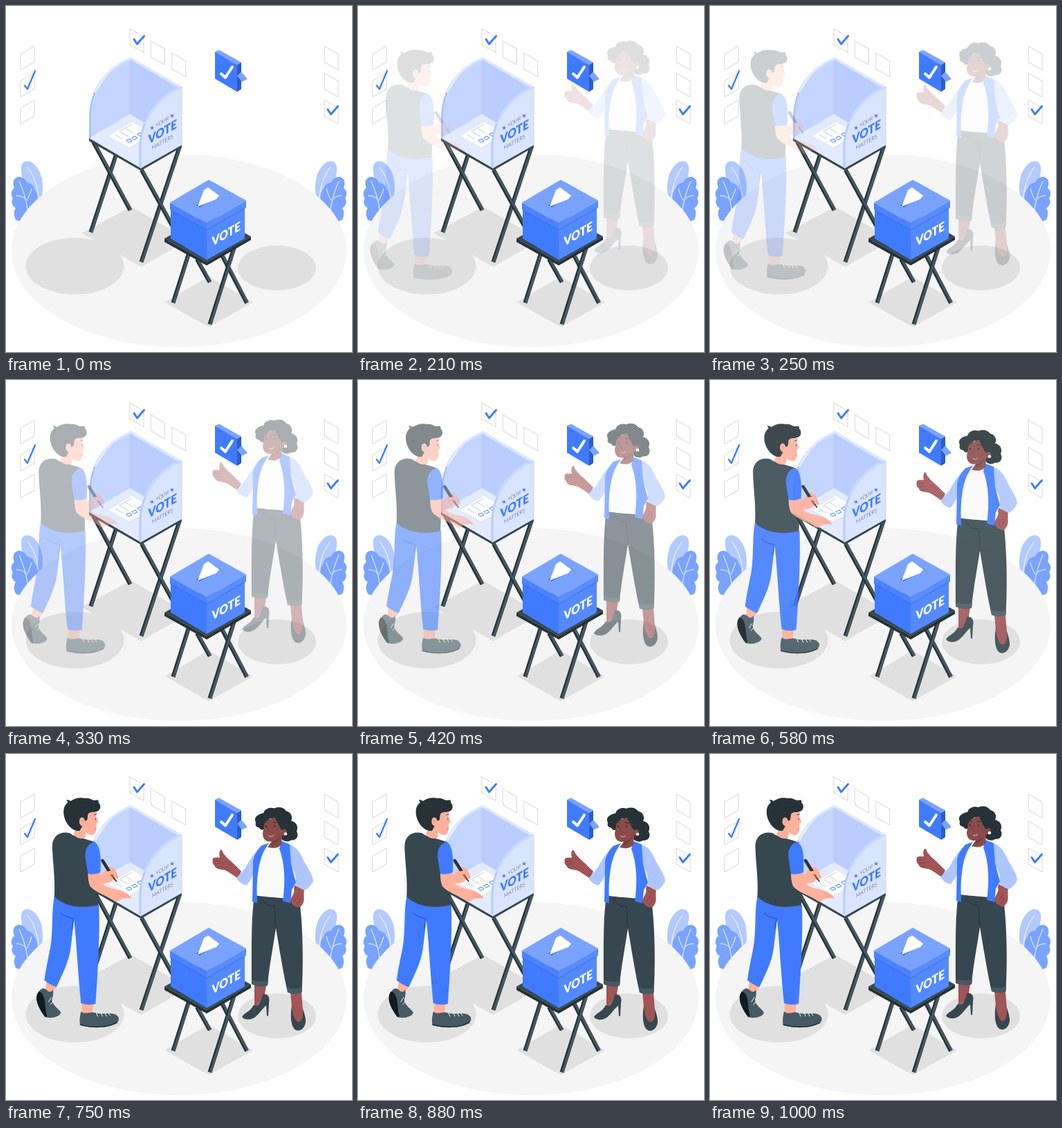
Animation, 500 px wide and 500 px high, one loop 1040 ms. Source, as an HTML page:

```html
<!DOCTYPE html>
<html lang="en">
<head>
<meta charset="utf-8">
<title>Voting day</title>
<style>
  html, body { margin: 0; width: 100%; height: 100%; overflow: hidden; background: #fff; }
  svg { display: block; width: 100%; height: 100%; }
  .bold { font: 900 18px Lato, sans-serif; }
  .thin { font: 300 8px Lato, sans-serif; fill: #37474f; }
  .blue { fill: #407bff; }
  .dark { fill: #263238; }
  .slate { fill: #37474f; }
  .shoe { fill: #455a64; }
  .white { fill: #fff; }
  .shade { fill: #e0e0e0; }
  .tan { fill: #ffb19b; }
  .brown { fill: #a05456; }
  .face { fill: #8a4b49; }
  .line { fill: none; stroke-linecap: round; stroke-linejoin: round; }
</style>
</head>
<body>
<svg viewBox="0 0 500 500">
  <defs>
    <g id="plant">
      <path fill="#b3caff" d="M22 236C21 225 31 220 41 229C52 239 55 258 52 276L44 294L30 264C25 255 22 246 22 236Z"/>
      <path fill="#79a3ff" d="M14 309C11 302 11 297 14 292C8 288 7 282 10 278C6 272 8 266 12 263C9 255 11 249 17 247C23 246 28 250 30 255C36 256 40 259 41 264C46 270 47 280 44 292L22 312Z"/>
      <path class="line" stroke="#fff" d="M31 233C40 244 46 260 47 277M19 253C25 267 31 284 32 304M15 274C21 274 25 276 28 279M37 264C35 271 33 276 30 281"/>
    </g>
    <path id="tick" class="line" stroke="#407bff" stroke-width="3" d="M185 48L189.500 55L199.500 43.500"/>
    <path id="star" class="blue" d="M0-3L.8-1L3-1L1.300.5L2 2.800L0 1.500L-2 2.800L-1.300.5L-3-1L-.8-1Z"/>
  </defs>

  <use href="#plant"/>
  <use href="#plant" transform="matrix(-1 0 0 1 500 0)"/>
  <ellipse cx="250" cy="353.500" rx="242" ry="139.500" fill="#f5f5f5"/>
  <g class="shade">
    <ellipse cx="99.500" cy="376" rx="71" ry="41"/>
    <ellipse cx="391.500" cy="378.500" rx="56.500" ry="32.500"/>
    <path d="M109 328L181 290L264 338L195 377ZM229 428L293 391L357 428L293 464Z"/>
  </g>
  <g id="boxes" fill="none" stroke="#e0e0e0" stroke-width="1.300"></g>
  <use href="#tick"/>
  <use href="#tick" x="280" y="101.500"/>
  <path class="line" stroke="#407bff" stroke-width="2.400" d="M27 115L31 120L42 94"/>

  <g id="bubble">
    <path fill="#79a3ff" d="M302 66L308 63.500L340 81.500L334 85Z"/>
    <path fill="#2d5cc8" d="M334 85L340 81.500V120L334 124Z"/>
    <path fill="#79a3ff" d="M334 101L340 95L349 105.500L341 109.500Z"/>
    <path class="blue" d="M302 66L334 85V124L302 105Z"/>
    <path class="line" stroke="#fff" stroke-width="4" d="M311 98L317 103.500L327 88"/>
  </g>

  <g id="boothLegs"></g>
  <g id="booth">
    <path class="slate" d="M120 190L194 232L254 199V204L195 238L120 195Z"/>
    <path fill="#e2ebff" d="M120 191L180 156L254 200L194 234Z"/>
    <path fill="#c4d6ff" d="M120 191V158C122 128 149 88 180 74V156Z"/>
    <path fill="#b9ceff" d="M180 74L254 117V200L180 156Z"/>
    <path class="line" stroke="#a0bdff" stroke-width=".7" d="M180 78V156L254 200"/>
    <path class="line" stroke="#dde7ff" stroke-width="3" d="M127 127C136 104 157 84 180 76L252 118"/>
    <path class="line" stroke="#a6c1ff" stroke-width="2.500" d="M121.500 190V158C122 147 124 136 128 126"/>
    <path class="white" stroke="#d5dce8" stroke-width=".6" d="M147 188L182 167L213 185L178 205Z"/>
    <path class="line" stroke="#c8ccd2" d="M158 186L168 192M165 182L176 188M173 177L184 184M164 181L182 171"/>
    <path class="line" stroke="#407bff" d="M174 194L179 192L182 195L177 197ZM182 190L187 188L190 191L185 193ZM190 185L195 183L198 186L193 188Z"/>
    <path fill="#d9e4ff" d="M194 235V202C195 172 216 134 254 117V201Z"/>
    <path class="line" stroke="#b6ccff" stroke-width="3" d="M194 232V202C194 189 197 179 201 169"/>
    <path class="line" stroke="#c8d9ff" stroke-width="3" d="M201 169C210 146 229 126 252 118"/>
    <path class="line" stroke="#b6ccff" stroke-width=".8" d="M254 117V200"/>
    <text class="bold blue" transform="matrix(.866 -.5 0 1 205.500 200)">VOTE</text>
    <text class="thin" transform="matrix(.866 -.5 0 1 216.500 175.500)">YOUR</text>
    <text class="thin" transform="matrix(.866 -.5 0 1 211 208)">MATTERS</text>
    <use href="#star" x="211" y="176"/>
    <use href="#star" x="240" y="158.500"/>
  </g>

  <g id="tableLegs"></g>
  <g id="ballotBox">
    <path class="dark" d="M229 336L290 370L354 333V338L290 375L229 341Z"/>
    <path class="slate" d="M229 336L293 300L354 333L290 370Z"/>
    <path class="blue" d="M238 290L290 318V367L238 336Z"/>
    <path fill="#538aff" d="M290 318L345 288V336L290 367Z"/>
    <path fill="#4a82ff" d="M237 284L290 314V324L237 294Z"/>
    <path fill="#588cff" d="M290 314L347 281V291L290 324Z"/>
    <path fill="#79a3ff" d="M237 284L293 251L347 281L290 314Z"/>
    <path class="line" stroke="#3566d6" stroke-width=".8" d="M238 294.500L290 324L346 291.500"/>
    <path fill="#2d5cc8" d="M275 288L304 273L307 276L279 291Z"/>
    <path class="white" d="M277 290L286 266L292 262L308 274L304 279Z"/>
    <text class="bold white" transform="matrix(.866 -.5 0 1 297.500 347.500)">VOTE</text>
  </g>

  <g id="man">
    <path class="tan" d="M57 328L72 335L64 348L55 344ZM108 358L125 360L123 376L108 375Z"/>
    <path class="shoe" d="M48 341C54 336 56 341 60 343Q65 345 66 340Q68 347 65 355C66 365 76 368 78 374C76 380 63 383 55 380L44 358C41 350 45 345 48 341Z"/>
    <path fill="#111b20" d="M46 343C40 350 42 363 55 380L58 379C54 367 57 354 50 345Z"/>
    <path class="shoe" d="M107 372C114 378 121 371 127 374C138 377 150 373 158 377Q164 382 160 387C148 398 120 396 106 392C104 384 106 377 107 372Z"/>
    <path class="line" stroke="#263238" stroke-width="1.500" d="M106 391C122 396 145 396 159 388"/>
    <path class="line" stroke="#fff" d="M60 358L64 352M63 362L67 357M131 379L129 374M138 379L136 374M144 379L142 375M149 378L147 375"/>
    <path class="blue" d="M68.500 205C64 228 67 253 63 278C59 298 56 312 54 327Q63 334 71.500 337C80 318 89 302 92 281L97 240C101 278 103 325 107 360Q117 364 128 361C131 318 134.500 265 133 218Z"/>
    <path class="line" stroke="#2d5cc8" stroke-width="1.500" d="M78 230C84 236 90 236 96 238L94 252"/>
    <path class="tan" d="M122 178C132 181 138 174 142 167C147 160 155 163 158 171L161 179L156 178L151 184C143 188 132 188 124 185Z"/>
    <path class="line" stroke="#263238" stroke-width="4.500" d="M138 154L148 170"/>
    <path class="line" stroke="#8f5a4d" stroke-width="3" d="M148 170L155 180"/>
    <path class="line" stroke="#263238" stroke-width="1.600" d="M155 180L158 184"/>
    <path class="line" stroke="#ffb19b" stroke-width="5" d="M146 172L154 171L158 178"/>
    <path class="line" stroke="#e58d78" stroke-width=".7" d="M148 174L154 174M157 172L159 178"/>
    <path class="slate" d="M90 114C76 111 65 119 65.500 134C66 157 70 179 68.500 206C80 219 107 225 132 218L133 180L128 128C116 122 101 122 90 114Z"/>
    <path class="tan" d="M117 172L135 171L137 186C145 195 157 194 167 198C175 202 179 206 180 209C172 208 168 208 163 211Q158 216 152 210C142 204 128 200 120 191Q117 184 117 172Z"/>
    <path class="line" stroke="#e58d78" stroke-width=".7" d="M166 202L177 206M164 205L173 207"/>
    <path class="blue" d="M126 127C115 130 111 142 114 154L117 173Q127 175 135 171C136 153 136 132 126 127Z"/>
    <path class="tan" d="M104 99L111 90C118 85 125 83 130 84L129 90L132 98L129 101C130 109 128 117 123 117Q118 117 114 113L113 121C108 124 99 121 96 116Z"/>
    <path class="dark" d="M88 70L86 66Q89 66 92 68C98 64 105 62 113 64C120 63 122 67 127 67C133 65 133 69 132 70C137 74 135 82 130 83C124 85 120 83 117 87L116 95L113 97C111 91 105 91 105 97C105 102 107 104 109 104L105 111L101 111C91 109 83 97 82 87C81 78 84 73 88 70Z"/>
    <ellipse class="tan" cx="108.500" cy="97.500" rx="4" ry="6"/>
    <path class="line" stroke="#263238" stroke-width=".9" d="M126 88L129 87M128 93V95"/>
    <path class="line" stroke="#d87f70" stroke-width=".8" d="M107 95Q111 96 109 100M126 109L129 108"/>
  </g>

  <g id="woman">
    <path class="brown" d="M359 331L376 333L373 352L359 365ZM411 343L427 343L429 368Q433 384 425 389L415 386Z"/>
    <path class="slate" d="M371 346C378 344 382 350 380 358L379 377H377L376 362C371 365 366 375 358 380C350 384 343 382 341 378C346 371 353 371 358 361C364 365 369 357 371 346ZM413 362C411 374 411 388 416 395C421 401 429 398 432 390C435 383 431 374 429 366C430 379 427 386 422 386C417 384 414 373 413 362Z"/>
    <path class="slate" d="M359 203C354 235 355 285 355 331Q366 336 378 333C380 308 386 277 390 250C396 285 401 317 407 343Q417 347 427.500 343C430 299 429 246 424 209Z"/>
    <path fill="#455a64" d="M355.500 325Q367 329 379 326L378 333Q366 336 355 331ZM406 336Q418 339 428 336L427.500 343Q417 347 407 343Z"/>
    <path class="line" stroke="#263238" d="M370 207C373 216 381 219 388 218L390 250"/>
    <path fill="#fafafa" d="M377 132L401 131L405 203Q382 208 362 202L367 150Z"/>
    <path class="brown" d="M335 178C327 173 319 166 314 166C306 165 302 163 301 159Q297 156 299 153Q297 149 302 148L309 148Q307 141 310 137Q312 136 314 142L320 149C325 153 332 160 340 168Z"/>
    <path class="line" stroke="#70403c" stroke-width=".7" d="M299 153L309 153M301 158L310 157M304 163L312 161"/>
    <path fill="#adc6ff" d="M370 131C362 136 352 152 346 163L333 178Q339 187 348 188C355 179 361 168 362 153Z"/>
    <path class="brown" d="M417 188L431 195C429 205 434 212 425 220C418 221 412 216 411 210C413 203 418 199 416 193Z"/>
    <path class="line" stroke="#70403c" stroke-width=".7" d="M416 212L423 204M420 216L427 207"/>
    <path fill="#adc6ff" d="M409 129C418 131 425 140 429 150C435 162 444 174 444 182C440 190 434 196 430 195Q421 191 418 186C421 175 416 166 410 158Z"/>
    <path class="blue" d="M380 127L369 131C361 140 356 149 357 158L356 212L363 214L362.500 195C363 171 366 149 375 135ZM398 124L410 129L412 158L419 184L413 195L411 214L400 211C404 184 403 157 395 135Z"/>
    <path class="dark" d="M372 84C374 77 382 75 388 77C395 74 402 76 405 81C412 82 415 90 412 95C420 97 423 104 420 110C424 118 419 124 412 123C406 127 398 124 397 118L383 91C378 94 376 98 375 103C374 109 369 110 366 105Q359 104 361 97C357 90 365 85 372 84Z"/>
    <path class="face" d="M374 97C379 93 385 91 389 90C392 98 396 105 399 109Q404 105 406 110C406 115 402 117 399 116L398 129C393 136 384 135 378 133L384 125C375 126 371 121 371 113Z"/>
    <path fill="#70403c" d="M384 125Q393 123 397 117Q393 127 383 130Z"/>
    <circle class="white" cx="404" cy="114" r="2.200"/>
    <g class="dark"><ellipse cx="376" cy="103" rx="1" ry="1.500"/><ellipse cx="388" cy="103" rx="1" ry="1.500"/></g>
    <path class="line" stroke="#263238" d="M373.500 98L377 96.500M386 97L391 98"/>
    <path class="line" stroke="#70403c" stroke-width=".9" d="M380 103L378 110L382 111"/>
    <path class="line" stroke="#d9a09a" stroke-width="1.200" d="M380 117Q384 119 387 116"/>
  </g>
</svg>
<script>
const LOOP = 1040, FRAME = 1000 / 24, SLIDE = 30;
const byId = id => document.getElementById(id);
const man = byId('man'), woman = byId('woman');

// Isometric checkboxes: left column, top row, right column.
const checkbox = (x, y, rise) => `<path d="M${x} ${y}l20 ${rise}v23l-20 ${-rise}z"/>`;
byId('boxes').innerHTML = [0, 1, 2].map(i =>
  checkbox(21, 69.5 + 39 * i, -11.5) +
  checkbox(179 + 30.3 * i, 33 + 17.5 * i, 11.5) +
  checkbox(460, 58 + 39 * i, 11.5)).join('');

const leg = path => `<path fill="none" stroke="#263238" stroke-width="6" d="${path}"/>
  <path fill="none" stroke="#455a64" stroke-width="3.2" d="${path}" transform="translate(1 -.3)"/>`;
byId('boothLegs').innerHTML =
  ['M159 215L122.500 327', 'M126 196L179.500 295', 'M251 203L195.500 370', 'M196 237L246 328'].map(leg).join('');
byId('tableLegs').innerHTML =
  ['M264 358L241.500 429', 'M276 366L294.500 399', 'M311 358L348 429', 'M330 348L294.500 460'].map(leg).join('');

const bezier = (a, b, s) => 3 * a * s * (1 - s) ** 2 + 3 * b * s * s * (1 - s) + s ** 3;

// Overshooting ease: cubic-bezier(.36, -.01, .5, 1.38)
function ease(x) {
  if (x <= 0 || x >= 1) return x <= 0 ? 0 : 1;
  let low = 0, high = 1;
  for (let i = 0; i < 30; i++) {
    const mid = (low + high) / 2;
    if (bezier(.36, .5, mid) < x) low = mid; else high = mid;
  }
  return bezier(-.01, 1.38, low);
}

function draw(ms) {
  const step = Math.floor((ms % LOOP + 4) / FRAME);
  const progress = ease(Math.min(step, 24) / 24);
  const offset = SLIDE * (progress - 1);
  const opacity = Math.max(0, Math.min(1, progress));
  man.setAttribute('transform', `translate(${offset} 0)`);
  woman.setAttribute('transform', `translate(0 ${offset})`);
  for (const person of [man, woman]) person.setAttribute('opacity', opacity);
}

const start = performance.now();
function tick() {
  draw(performance.now() - start);
  requestAnimationFrame(tick);
}
tick();
</script>
</body>
</html>
```
